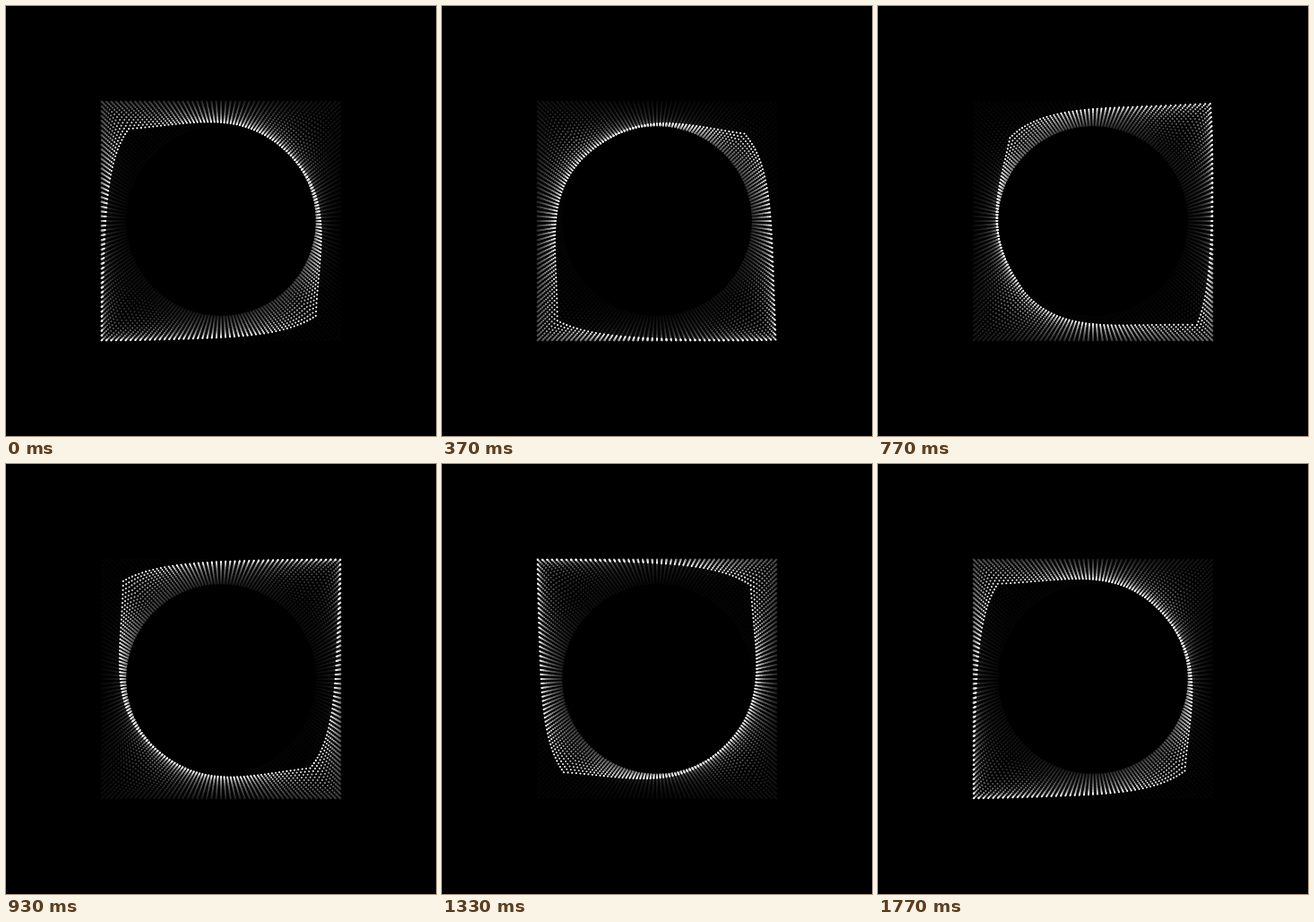
Recreate the animation shown at these times as an HTML page with a canvas. Size 480 px wide and 480 px high, loop 1.81 s.

```html
<!DOCTYPE html>
<html lang="en">
<head>
<meta charset="utf-8">
<title>Square and circle wave</title>
<style>
  html, body { margin: 0; width: 100%; height: 100%; overflow: hidden; background: #000; }
  canvas { display: block; width: 480px; height: 480px; }
</style>
</head>
<body>
<canvas id="stage" width="480" height="480"></canvas>
<script>
const ctx = document.getElementById('stage').getContext('2d');
const LOOP = 1810, STEPS = 54, STEP_MS = 100 / 3;
const CENTER = 240, HALF = 133.3, RADIUS = 106.7;
const PER_SIDE = 50, DOT = 1.08;
const FADE = 0.89, RESIDUE = 0.018, LEAD = 0.05;

// Evenly spaced points on the square, each paired with an evenly spaced point on the circle.
const dots = [];
for (let side = 0; side < 4; side++) {
  const turn = side * Math.PI / 2;
  const c = Math.round(Math.cos(turn)), s = Math.round(Math.sin(turn));
  for (let i = 0; i < PER_SIDE; i++) {
    const u = 2 * i / PER_SIDE - 1;
    const angle = turn + u * Math.PI / 4;
    dots.push({
      square: [HALF * (c - s * u), HALF * (s + c * u)],
      circle: [RADIUS * Math.cos(angle), RADIUS * Math.sin(angle)],
      // Zero at the bottom left corner, growing counterclockwise on screen.
      phase: 3 * Math.PI / 4 - angle
    });
  }
}

const lerp = (a, b, mix) => a + (b - a) * mix;

function drawDots(step, level) {
  const wave = 2 * Math.PI * step / STEPS + LEAD;
  const shade = Math.round(255 * level);
  ctx.fillStyle = `rgb(${shade},${shade},${shade})`;
  ctx.beginPath();
  for (const { square, circle, phase } of dots) {
    const mix = 0.5 + 0.5 * Math.cos(wave - phase);
    const x = CENTER + lerp(circle[0], square[0], mix);
    const y = CENTER + lerp(circle[1], square[1], mix);
    ctx.moveTo(x + DOT, y);
    ctx.arc(x, y, DOT, 0, 2 * Math.PI);
  }
  ctx.fill();
}

function draw(step) {
  ctx.fillStyle = '#000';
  ctx.fillRect(0, 0, 480, 480);
  for (let age = STEPS - 1; age >= 0; age--) {
    drawDots(step - age, Math.max(FADE ** age, RESIDUE));
  }
}

const start = performance.now();
let shown = -1;
function tick() {
  const t = (performance.now() - start) % LOOP;
  const step = Math.min(STEPS - 1, Math.floor((t + 3.4) / STEP_MS));
  if (step !== shown) draw(shown = step);
  requestAnimationFrame(tick);
}
tick();
</script>
</body>
</html>
```
